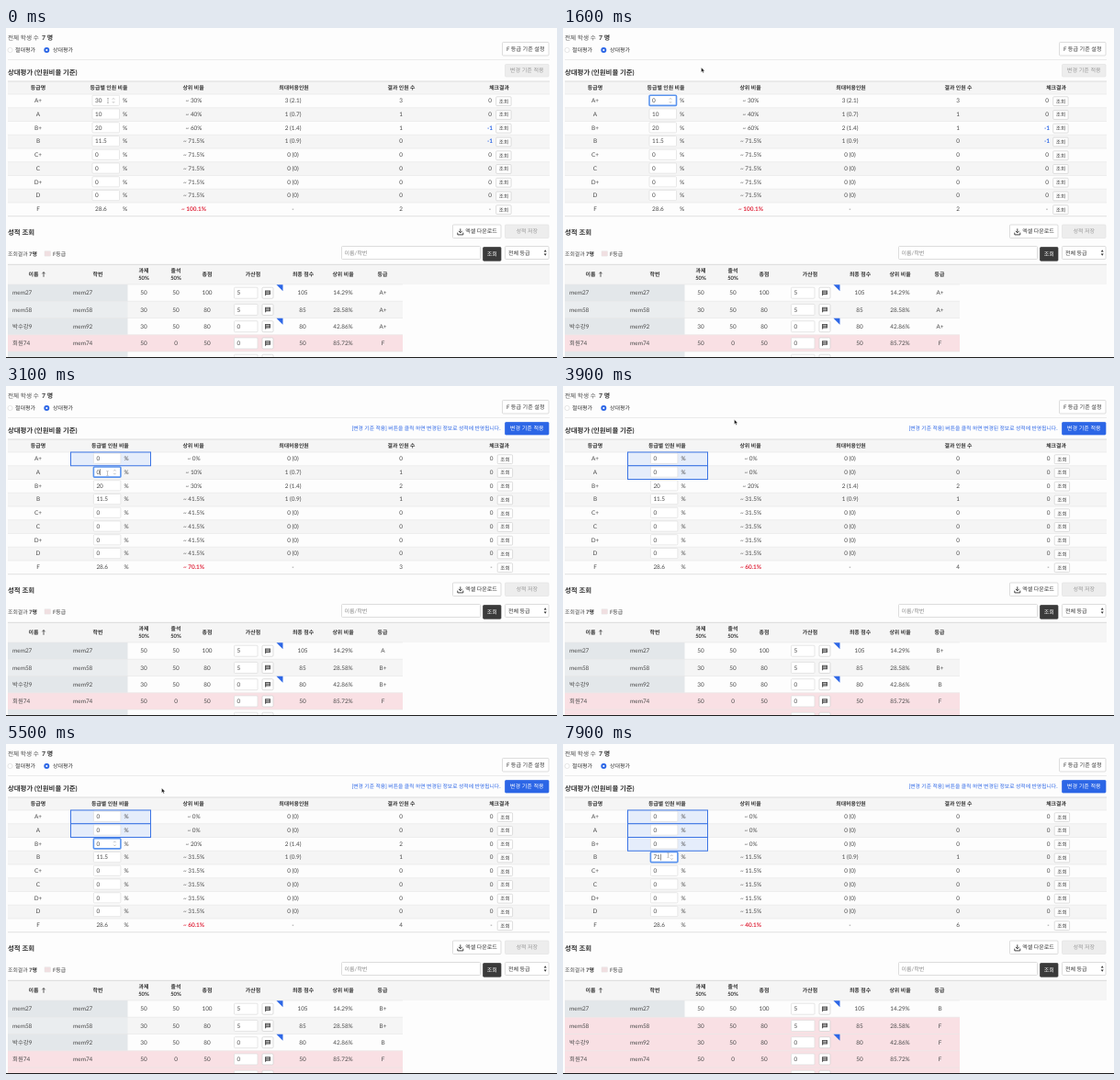
An HTML page that plays this animation: 600 px wide and 359 px high, repeating every 8000 ms.

```html
<!DOCTYPE html>
<html lang="ko">
<head>
<meta charset="utf-8">
<title>상대평가</title>
<style>
  html, body { margin: 0; width: 100%; height: 100%; overflow: hidden; background: #fdfdfd; }
  svg { display: block; width: 600px; height: 359px; }
  text {
    font-family: Lato, "Noto Sans CJK KR", "Noto Sans CJK JP", sans-serif;
    text-rendering: geometricPrecision; white-space: pre;
  }
</style>
</head>
<body>
<svg id="stage" viewBox="0 0 600 359" xmlns="http://www.w3.org/2000/svg">
  <g id="page"></g>
  <path id="arrow" d="M0 0V5.2L1.2 4.1 2 6 2.9 5.6 2.1 3.8H3.8Z" fill="#111" stroke="#fff" stroke-width=".4"/>
  <path id="beam" d="M-1-2.6Q0-2.6 0-1.9Q0-2.6 1-2.6M0-1.9V1.9M-1 2.6Q0 2.6 0 1.9Q0 2.6 1 2.6" fill="none" stroke="#888" stroke-width=".5"/>
</svg>
<script>
const LOOP = 8000, STEP = 100;
const BLUE = '#2c66e6', RED = '#e0263c', INK = '#4a4a4a', DARK = '#333', PINK = '#f9e0e4';
const SHADE = '#f5f5f5', RULE = '#e4e4e4', EDGE = '#cfcfcf';
const ROW_TOP = 72, ROW_H = 14.75, LIST_TOP = 279, LIST_H = 18.25;

const grades = ['A+', 'A', 'B+', 'B', 'C+', 'C', 'D+', 'D', 'F'];
const shares = [30, 10, 20, 11.5, 0, 0, 0, 0, 28.6];
const firstCounts = [3, 1, 1, 0, 0, 0, 0, 0, 2];

const edits = [
  { row: 0, focus: 400, blur: 1800, typed: [[900, '0']] },
  { row: 1, focus: 2500, blur: 3800, typed: [[3000, '0']] },
  { row: 2, focus: 4500, blur: 5800, typed: [[4900, '0']] },
  { row: 3, focus: 6900, blur: 9000, typed: [[7400, '7'], [7700, '71']] }
];

// time, x, y
const path = [
  [0, 111, 79], [1100, 111, 79], [1500, 150.5, 43], [1800, 150.5, 43],
  [2200, 110.5, 95], [3200, 110.5, 95], [3700, 186.5, 36.5], [3900, 186.5, 36.5],
  [4400, 112, 109], [5000, 112, 109], [5400, 169.5, 48], [5800, 169.5, 48],
  [6300, 114.5, 121], [8000, 114.5, 121]
];

const students = [
  { name: 'mem27', id: 'mem27', marks: [50, 50, 100], bonus: 5, total: 105, rank: '14.29%', grades: ['A+', 'A', 'B+', 'B'], note: true },
  { name: 'mem58', id: 'mem58', marks: [30, 50, 80], bonus: 5, total: 85, rank: '28.58%', grades: ['A+', 'B+', 'B+', 'F'] },
  { name: '박수강9', id: 'mem92', marks: [30, 50, 80], bonus: 0, total: 80, rank: '42.86%', grades: ['A+', 'B+', 'B', 'F'], note: true },
  { name: '회원74', id: 'mem74', marks: [50, 0, 50], bonus: 0, total: 50, rank: '85.72%', grades: ['F', 'F', 'F', 'F'] }
];

const rect = (x, y, w, h, fill, stroke = 'none', r = 0, sw = .7) =>
  `<rect x="${x}" y="${y}" width="${w}" height="${h}" rx="${r}" fill="${fill}" stroke="${stroke}" stroke-width="${sw}"/>`;
const line = (x1, x2, y, color, w = .7) =>
  `<path d="M${x1} ${y}H${x2}" stroke="${color}" stroke-width="${w}"/>`;
const shape = (d, fill, stroke = 'none', w = .8) =>
  `<path d="${d}" fill="${fill}" stroke="${stroke}" stroke-width="${w}"/>`;

// y is the vertical middle of the text
function text(s, x, y, { size = 6.4, color = INK, weight = 400, anchor = 'start' } = {}) {
  return `<text x="${x}" y="${(y + size * .355).toFixed(2)}" font-size="${size}" fill="${color}"` +
    ` font-weight="${weight}" text-anchor="${anchor}">${s}</text>`;
}
const mid = (s, x, y, opt = {}) => text(s, x, y, { ...opt, anchor: 'middle' });
const head = (s, x, y) => mid(s, x, y, { size: 5.9, color: DARK, weight: 700 });
const title = (s, y) => text(s, 2, y, { size: 7.4, color: DARK, weight: 700 });

function button(label, x, y, w, h, { fill = '#fff', stroke = EDGE, color = DARK, size = 6, tx = x + w / 2 } = {}) {
  return rect(x, y, w, h, fill, stroke, 1) + mid(label, tx, y + h / 2, { size, color });
}
const grayButton = { fill: '#ededed', stroke: '#e2e2e2', color: '#999' };
const blueButton = { fill: BLUE, stroke: BLUE, color: '#fff' };
const spinner = (x, y) =>
  shape(`M${x - 1.2} ${y - 1.2}l1.2-1.3 1.2 1.3M${x - 1.2} ${y + 1.2}l1.2 1.3 1.2-1.3`, 'none', '#999', .6);

const fixed = n => String(Math.round(n * 10) / 10);

function topArea(applied) {
  const label = { size: 6, color: DARK, weight: 500 };
  let s = text('전체 학생 수', 2, 10.8, { size: 6.6 }) + text('7 명', 39, 10.8, { size: 6.9, color: DARK, weight: 700 });
  s += `<circle cx="4.5" cy="24" r="2.6" fill="#fff" stroke="#d4d4d4" stroke-width=".6"/>`;
  s += text('절대평가', 10, 24, label);
  s += `<circle cx="44.3" cy="24" r="3" fill="${BLUE}"/><circle cx="44.3" cy="24" r="1.1" fill="#fff"/>`;
  s += text('상대평가', 51, 24, label);
  s += button('F 등급 기준 설정', 540.5, 15.5, 50.5, 14.5, { size: 6.1 });
  s += line(2, 592, 34.5, RULE) + title('상대평가 (인원비율 기준)', 48.2);
  s += button('변경 기준 적용', 543.5, 39.5, 47.5, 13.5, { ...(applied ? blueButton : grayButton), size: 6.1 });
  if (applied) {
    s += text('[변경 기준 적용] 버튼을 클릭 하면 변경된 정보로 성적에 반영됩니다.', 538.5, 45.5,
      { size: 5.8, color: BLUE, weight: 500, anchor: 'end' });
  }
  return s;
}

function ratioCell(i, y, t, dx, hovered) {
  const edit = edits.find(e => e.row === i);
  const active = edit && t >= edit.focus && t < edit.blur;
  const last = edit && edit.typed.filter(k => k[0] <= t).pop();
  const value = last ? last[1] : shares[i];
  const x = 97 + dx;
  let s = '';
  if (edit && t >= edit.blur) {
    s += rect(70.5, ROW_TOP + i * ROW_H, 87, ROW_H, '#e5edfb', '#3b74e4', 0, 1);
  }
  if (i < 8) s += rect(94 + dx, y - 5.7, 29.5, 11.2, '#fff', active ? '#5b94ee' : '#dedede', 1, active ? 1.6 : .7);
  if (active && !last) s += rect(x - .5, y - 3.7, String(value).length * 3.7, 7.2, '#b4d3fb');
  s += text(value, x, y);
  if (active && last && (t - last[0]) % 1000 < 500) {
    s += rect(x + .3 + value.length * 3.72, y - 3.4, .5, 6.8, '#222');
  }
  if (active || hovered) s += spinner(117 + dx, y);
  return s + text('%', 127 + dx, y);
}

function ratioTable(t, stage, hoverRow) {
  const now = shares.map((v, i) => i < stage ? 0 : v);
  const dx = stage ? 1.4 : 0;
  let s = rect(2, 58, 590, 14, SHADE) + line(2, 592, 58, '#cfcfcf');
  const titles = [['등급명', 35], ['등급별 인원 비율', 112 + dx], ['상위 비율', 204],
    ['최대허용인원', 313.5], ['결과 인원 수', 430.5], ['체크결과', 537]];
  for (const [label, x] of titles) s += head(label, x, 65);
  let sum = 0, left = 7;
  const cells = [];
  now.forEach((v, i) => {
    const top = ROW_TOP + i * ROW_H, y = top + 6.9, isF = i === 8;
    const most = Math.ceil(v * 7 / 100), exact = Math.ceil(v * 7 / 10) / 10;
    sum += v;
    const count = stage ? (isF ? left : most) : firstCounts[i];
    left -= count;
    const check = isF ? '-' : count - most;
    s += rect(2, top, 590, ROW_H, i % 2 ? SHADE : '#fdfdfd') + line(2, 592, top, RULE, .6);
    cells.push(ratioCell(i, y, t, dx, hoverRow === i));
    s += mid(grades[i], 35, y);
    s += mid(`~ ${fixed(sum)}%`, 204.5, y, isF ? { color: RED, weight: 700 } : {});
    s += mid(isF ? '-' : `${most} (${exact})`, 312.5, y);
    s += mid(count, 430, y);
    s += mid(check, stage ? 528.5 : 527, y, check < 0 ? { color: BLUE, weight: 700 } : {});
    s += button('조회', stage ? 535.2 : 533.7, y - 4.1, 16.4, 9.8, { size: 5.6 });
  });
  // Cells come last so their frames lie over the row lines.
  return s + cells.join('') + line(2, 592, ROW_TOP + 9 * ROW_H, '#d4d4d4');
}

function searchBar() {
  let s = title('성적 조회', 222.8);
  s += button('엑셀 다운로드', 486.5, 214, 52.5, 14.5, { tx: 517.5 });
  s += shape('M494.8 218.3v4.4m-2-1.9 2 2 2-2M491.8 222.6v2.3h6v-2.3', 'none', DARK, .9);
  s += button('성적 저장', 543.5, 214, 47.5, 14.5, grayButton);
  s += text('조회결과', 2, 245.6, { size: 5.9 }) + text('7명', 25, 245.6, { size: 5.9, color: DARK, weight: 700 });
  s += rect(42, 242.8, 6.5, 5.3, '#f0dfe1', '#e0e0e0', 0, .4);
  s += text('F등급', 51, 245.6, { size: 5.9, color: DARK });
  s += rect(365.5, 237.5, 151, 14, '#fff', EDGE, 1) + text('이름/학번', 368.5, 244.6, { size: 6, color: '#888' });
  s += button('조회', 519.5, 238.5, 19.5, 14.8, { fill: '#3a3a3a', stroke: '#3a3a3a', color: '#fff' });
  s += rect(543.5, 237.5, 47.5, 14, '#fff', EDGE, 1) + text('전체 등급', 547, 244.5, { size: 6, color: DARK });
  return s + shape('M585.7 243.6l1.5-2.3 1.5 2.3zM585.7 245.4l1.5 2.3 1.5-2.3z', '#333');
}

const bonusFrames = y =>
  rect(248.5, y - 6, 25.5, 12, '#fff', '#dcdcdc', 1) + rect(279, y - 6, 12, 12, '#fff', EDGE, 1.2);

function bonusBox(value, y) {
  return bonusFrames(y) + text(value, 251.5, y) +
    shape(`M282 ${y - 2.7}h6v4.5h-4.4l-1.6 1.5z`, '#555') +
    line(283.2, 286.8, y - 1.3, '#fff', .6) + line(283.2, 286.8, y + .3, '#fff', .6);
}

function rowBack(i, failed) {
  const top = LIST_TOP + i * LIST_H;
  let s = rect(2, top, 430, LIST_H, failed ? PINK : i % 2 ? SHADE : '#fdfdfd');
  if (!failed) s += rect(2, top, 130.5, LIST_H, i % 2 ? '#eaedef' : '#e3e7ea');
  return s + line(2, 432, top, RULE, .6);
}

function studentTable(stage) {
  let s = rect(2, 257, 590, 22, SHADE) + line(2, 592, 257.3, '#cfcfcf');
  const titles = [['이름', 30], ['학번', 100], ['총점', 219], ['가산점', 269],
    ['최종 점수', 323.5], ['상위 비율', 367], ['등급', 410]];
  for (const [label, x] of titles) s += head(label, x, 268);
  s += shape('M41 270.8v-5.2m-1.6 1.7 1.6-1.7 1.6 1.7', 'none', DARK, .8);
  for (const [label, x] of [['과제', 150], ['출석', 185]]) s += head(label, x, 264.3) + head('50%', x, 272.2);
  students.forEach((p, i) => {
    const top = LIST_TOP + i * LIST_H, y = top + 9.2, grade = p.grades[stage];
    s += rowBack(i, grade === 'F') + text(p.name, 7, y) + text(p.id, 73, y);
    [150, 185, 219].forEach((x, k) => s += mid(p.marks[k], x, y));
    s += bonusBox(p.bonus, y);
    if (p.note) s += shape(`M294.5 ${top + .3}h7v7z`, BLUE);
    s += mid(p.total, 323, y) + mid(p.rank, 367, y) + mid(grade, 410.5, y);
  });
  const next = students.length;
  s += rowBack(next, stage > 1) + bonusFrames(LIST_TOP + next * LIST_H + 9.2);
  return s + rect(0, 358, 600, 1, '#1c1c1c');
}

function pointer(t) {
  const i = path.findIndex((k, n) => n && t <= k[0]);
  const [t0, x0, y0] = path[i - 1], [t1, x1, y1] = path[i];
  const u = (t - t0) / (t1 - t0), e = u * u * (3 - 2 * u);
  return [x0 + (x1 - x0) * e, y0 + (y1 - y0) * e];
}

const page = document.getElementById('page');
const arrow = document.getElementById('arrow');
const beam = document.getElementById('beam');
let shown = '';

function draw(t) {
  const [x, y] = pointer(t);
  const row = Math.floor((y - ROW_TOP) / ROW_H);
  const inside = x > 94 && x < 125 && row >= 0 && row < 8;
  const stage = edits.filter(e => e.blur <= t).length;
  const html = topArea(stage > 0) + ratioTable(t, stage, inside ? row : -1) + searchBar() + studentTable(stage);
  if (html !== shown) page.innerHTML = shown = html;
  for (const el of [arrow, beam]) el.setAttribute('transform', `translate(${x} ${y})`);
  arrow.style.display = inside ? 'none' : '';
  beam.style.display = inside ? '' : 'none';
}

const start = performance.now();
function tick() {
  const t = (performance.now() - start) % LOOP;
  draw(Math.floor(t / STEP) * STEP);
  requestAnimationFrame(tick);
}
tick();
</script>
</body>
</html>
```
